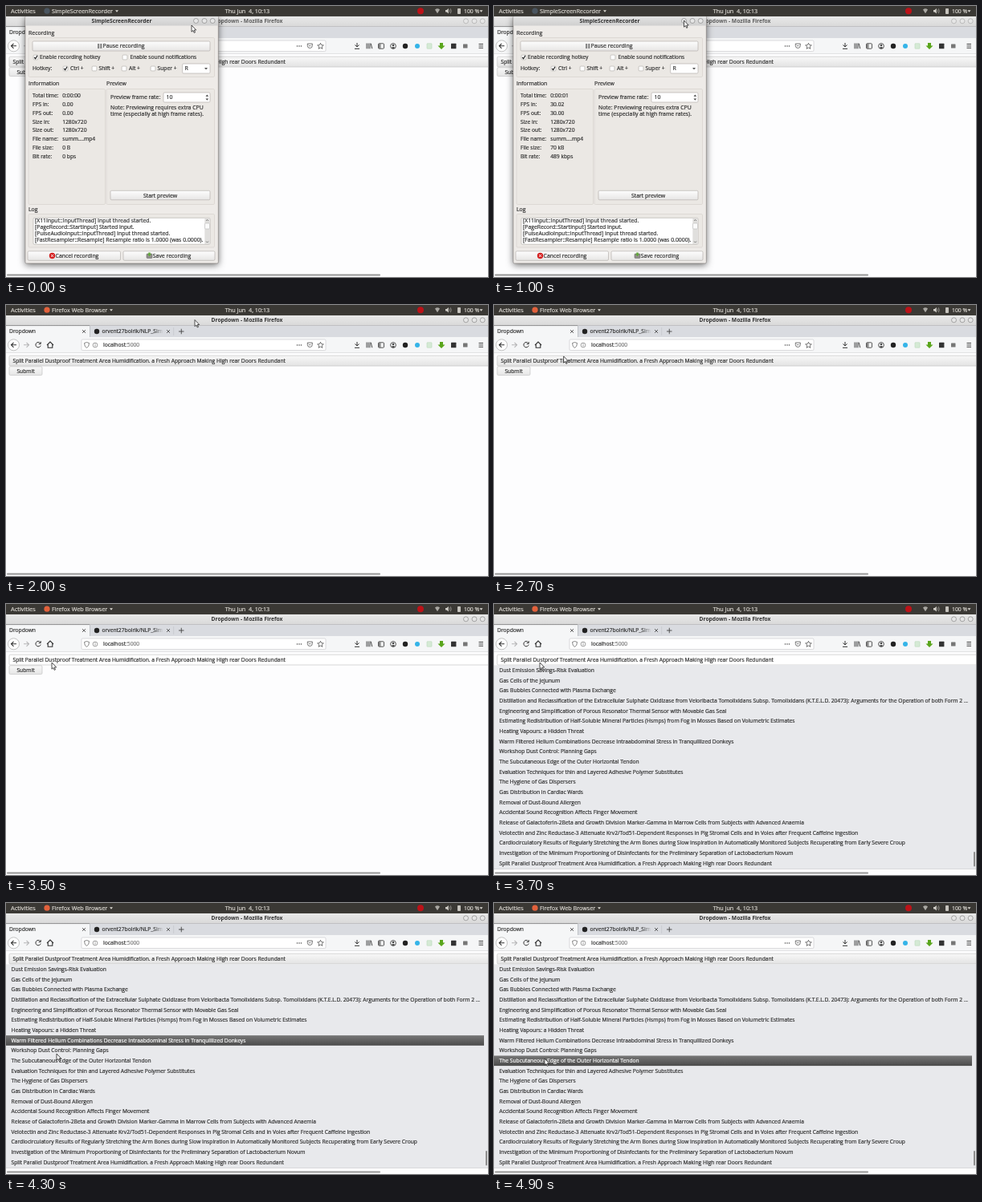
Write an HTML page with a canvas that moves like this. It is 600 px wide and 338 px high and loops after 5 s.

```html
<!DOCTYPE html>
<html lang="en">
<head>
<meta charset="utf-8">
<title>Dropdown</title>
<style>
html, body { margin: 0; width: 100%; height: 100%; overflow: hidden; background: #fdfdfe; }
canvas { display: block; width: 100vw; height: 100vh; }
</style>
</head>
<body>
<canvas id="stage"></canvas>
<script>
const W = 600, H = 338, LOOP = 5000, STEP = 100;
const canvas = document.getElementById('stage');
const ratio = window.devicePixelRatio || 1;
canvas.width = W * ratio;
canvas.height = H * ratio;
const c = canvas.getContext('2d');

const INK = '#303030';
const CHOSEN = 'Split Parallel Dustproof Treatment Area Humidification. a Fresh Approach Making High rear Doors Redundant';
const OPTIONS = [
  'Dust Emission Savings-Risk Evaluation',
  'Gas Cells of the Jejunum',
  'Gas Bubbles Connected with Plasma Exchange',
  'Distillation and Reclassification of the Extracellular Sulphate Oxidizase from Veloribacta Tomolixidans Subsp. Tomolixidans (K.T.E.L.D. 20473): Arguments for the Operation of both Form 2 …',
  'Engineering and Simplification of Porous Resonator Thermal Sensor with Movable Gas Seal',
  'Estimating Redistribution of Half-Soluble Mineral Particles (Hsmps) from Fog in Mosses Based on Volumetric Estimates',
  'Heating Vapours: a Hidden Threat',
  'Warm Filtered Helium Combinations Decrease Intraabdominal Stress in Tranquillized Donkeys',
  'Workshop Dust Control: Planning Gaps',
  'The Subcutaneous Edge of the Outer Horizontal Tendon',
  'Evaluation Techniques for thin and Layered Adhesive Polymer Substitutes',
  'The Hygiene of Gas Dispersers',
  'Gas Distribution in Cardiac Wards',
  'Removal of Dust-Bound Allergen',
  'Accidental Sound Recognition Affects Finger Movement',
  'Release of Galactoferin-2Beta and Growth Division Marker-Gamma in Marrow Cells from Subjects with Advanced Anaemia',
  'Velotectin and Zinc Reductase-3 Attenuate Krv2/Tod51-Dependent Responses in Pig Stromal Cells and in Voles after Frequent Caffeine Ingestion',
  'Cardiocirculatory Results of Regularly Stretching the Arm Bones during Slow Inspiration in Automatically Monitored Subjects Recuperating from Early Severe Croup',
  'Investigation of the Minimum Proportioning of Disinfectants for the Preliminary Separation of Lactobacterium Novum',
  CHOSEN
];
const ROW_TOP = 82.7, ROW = 12.66;

// Keyframes: time, then values
const POINTER = [
  [0, 231, 24], [100, 231, 24], [600, 236.5, 18], [1800, 236.5, 18], [2000, 235, 18.5],
  [2200, 235, 18.5], [2800, 57, 73], [3700, 57, 73], [4100, 61, 157], [4300, 63, 188], [4400, 63, 194]
];
const HIGHLIGHT = [[3700, 70], [4200, 158], [4300, 171], [4400, 196.5]];

function track(keys, t) {
  const i = keys.findIndex(k => k[0] > t);
  if (i < 0) return keys[keys.length - 1].slice(1);
  if (i === 0) return keys[0].slice(1);
  const a = keys[i - 1], b = keys[i], p = (t - a[0]) / (b[0] - a[0]);
  return a.slice(1).map((v, n) => v + (b[n + 1] - v) * p);
}

// Type is set large and scaled down so that glyph spacing stays fractional; y is the middle of the line.
// A hairline stroke gives the regular cut a slightly heavier weight.
function text(s, x, y, { size = 6.7, color = INK, bold = false, align = 'left' } = {}) {
  c.save();
  c.translate(x, y + size * 0.36);
  c.scale(0.1, 0.1);
  c.font = `${bold ? 'bold ' : ''}${size * 10}px "Open Sans", "Noto Sans", sans-serif`;
  c.textAlign = align;
  c.fillStyle = c.strokeStyle = color;
  c.lineWidth = 2;
  c.lineJoin = 'round';
  c.fillText(s, 0, 0);
  if (!bold) c.strokeText(s, 0, 0);
  const width = c.measureText(s).width / 10;
  c.restore();
  return width;
}
function rect(x, y, w, h, fill) {
  c.fillStyle = fill;
  c.fillRect(x, y, w, h);
}
function shade(y, h, top, bottom) {
  const g = c.createLinearGradient(0, y, 0, y + h);
  g.addColorStop(0, top);
  g.addColorStop(1, bottom);
  return g;
}
function box(x, y, w, h, fill, stroke, radius = 1.5, width = 0.6) {
  c.beginPath();
  c.roundRect(x, y, w, h, radius);
  if (fill) { c.fillStyle = fill; c.fill(); }
  if (stroke) { c.strokeStyle = stroke; c.lineWidth = width; c.stroke(); }
}
function disc(x, y, r, fill, stroke, width = 0.7) {
  box(x - r, y - r, 2 * r, 2 * r, fill, stroke, r, width);
}
function line(d, color = INK, width = 0.9) {
  c.strokeStyle = color;
  c.lineWidth = width;
  c.stroke(new Path2D(d));
}
function fillPath(d, color = INK) {
  c.fillStyle = color;
  c.fill(new Path2D(d));
}
const button = (x, y, w, h) => box(x, y, w, h, shade(y, h, '#fdfdfd', '#e7e6e5'), '#aba7a3');
const caret = (x, y, color) => fillPath(`M${x - 2} ${y - 1}h4l-2 2.6z`, color);
const cross = (x, y) => line(`M${x - 2} ${y - 2}l4 4m0-4l-4 4`, '#444', 0.8);

function windowButtons(xs, y, color, hovered = -1) {
  xs.forEach((x, i) => disc(x, y, 3, i === hovered ? '#999' : '#e6e6e6', color));
}

function panel(focused) {
  rect(0, 0, W, 12.8, '#3a3834');
  const light = { size: 7.2, color: '#dedbd5' };
  text('Activities', 6, 6.2, { ...light, size: 7.5 });
  disc(51, 6.2, 3.6, focused ? '#4a5560' : '#e2613c');
  text(focused ? 'SimpleScreenRecorder' : 'Firefox Web Browser', 57, 6.2, light);
  caret(focused ? 138 : 131, 6.2, light.color);
  text('Thu Jun  4, 10:13', 300.5, 6.2, { ...light, align: 'center' });
  disc(516, 6.2, 4, '#bd1218');
  fillPath('M534 4.5q3-2.5 6 0l-3 4.800z', '#aaa8a3');
  fillPath('M547 5h1.500l2.300-2v6.600l-2.300-2h-1.500z', '#d0cdc7');
  line('M552 4.500q1.300 1.800 0 3.600m1.300-4.800q2.200 3 0 6', '#aaa8a3', 0.7);
  box(562, 3, 4, 7, '#c6c3bd', null, 0.8);
  text('100 %', 570, 6.2, { ...light, size: 6.8 });
  caret(591.5, 6.2, light.color);
}

function toolbar() {
  rect(0, 40, W, 20, '#f5f6f7');
  rect(0, 59.5, W, 0.6, '#cfcfd1');
  disc(9.5, 49.8, 7, '#fff', '#aaa');
  line('M13 49.8h-6.5m3-3l-3 3l3 3', '#333', 1.1);
  line('M22 49.8h6.5m-3-3l3 3l-3 3', '#b5b5b7', 1.1);
  line('M42.6 47.6a3.2 3.2 0 1 0 .6 3m0-4.5v2.5h-2.5', '#333', 1);
  line('M51 50l4-4l4 4m-6.8-1v4.2h5.6v-4.2', '#333', 1.1);
  box(94, 43, 304, 13.6, '#fff', '#c3c3c6');
  line('M100.5 46.5l3 1q0 4.5-3 6q-3-1.5-3-6z', '#666', 0.8);
  disc(111, 50, 2.9, null, '#777');
  line('M111 49.5v2m0-3.5v.8', '#777', 0.8);
  const hostWidth = text('localhost', 121, 50);
  text(':5000', 121 + hostWidth, 50, { color: '#777' });
  [362.5, 365, 367.5].forEach(x => disc(x, 50, 0.8, '#555'));
  line('M375.3 47h6v2.5a3 3 0 0 1-6 0zm1.5 1.7l1.5 1.5l1.5-1.5', '#555', 0.8);
  line('M391.5 46.2l1.1 2.5l2.7.2l-2.1 1.8l.7 2.7l-2.4-1.5l-2.4 1.5l.7-2.7l-2.1-1.8l2.7-.2z', '#555', 0.8);
  line('M437 46v5m-2.5-2.5l2.5 2.5l2.5-2.5m-5.5 4.8h6', '#333', 1);
  line('M449 46.5v6.8m2-6.8v6.8m2-6.8v6.8m1.2-6.6l1.6 6.5', '#333', 0.9);
  box(463.5, 46.8, 7, 6.4, null, '#444', 1, 0.9);
  rect(464, 47, 2.5, 6, '#888');
  disc(482, 50, 3.4, null, '#444', 0.9);
  disc(482, 49, 1.3, '#444');
  fillPath('M479.7 52.2q2.3-2.5 4.6 0l-2.3 1z', '#444');
  disc(497, 50, 3.2, '#222');
  disc(512, 50, 3, '#35b4e8');
  box(524, 46.8, 6, 6.4, '#d5ead5', '#b9d8b9', 0.5);
  fillPath('M540 46h4v3.5h2.5l-4.5 4.5l-4.5-4.5h2.5z', '#5aa51c');
  box(554, 46.8, 6.4, 6.4, '#333', null, 0.5);
  box(569, 47.5, 5.5, 5, '#777', null, 0.5);
  line('M588.5 47.5h5.5m-5.5 2.4h5.5m-5.5 2.4h5.5', '#333', 0.9);
}

function browser(dialogFocused) {
  rect(0, 12.8, W, 12.7, shade(12.8, 12.7, '#e9e9e9', '#d9d9d9'));
  text('Dropdown - Mozilla Firefox', 300, 18.8, { bold: true, color: dialogFocused ? '#5c5c5c' : '#303030', align: 'center' });
  windowButtons([572.5, 583, 593.2], 18.8, dialogFocused ? '#aaa' : '#888');
  rect(0, 25.5, W, 14.5, '#d9dbe0');
  rect(0, 25, W, 0.6, '#b4b4b6');
  rect(0, 25.5, 104, 14.5, '#f5f6f7');
  rect(0, 25.2, 104, 0.9, '#858585');
  rect(104, 26, 0.6, 14, '#b0b2b6');
  rect(208.5, 28, 0.6, 10, '#bfc1c5');
  text('Dropdown', 4, 33);
  cross(97, 33);
  disc(113, 33, 3.2, '#222');
  c.save();
  c.beginPath();
  c.rect(119, 26, 77, 14);
  c.clip();
  text('orvent27bolrik/NLP_Sim', 119.5, 33);
  const fade = c.createLinearGradient(184, 0, 196, 0);
  fade.addColorStop(0, '#d9dbe000');
  fade.addColorStop(1, '#d9dbe0');
  rect(184, 26, 12, 13.5, fade);
  c.restore();
  cross(202, 33);
  line('M215 33h6.5m-3.25-3.25v6.5', '#444', 0.9);
  toolbar();
}

function page(active) {
  rect(0, 60, W, H - 60, '#fdfdfe');
  box(4, 63.2, 602, 12.8, active ? '#fff' : shade(63, 13, '#f8f8f8', '#e3e3e3'), '#bcbcbc');
  text(CHOSEN, 8.5, 69.8);
  box(4, 76.8, 41, 10.8, shade(77, 11, '#f8f8f8', '#e5e5e5'), '#bcbcbc');
  text('Submit', 24.5, 82.3, { align: 'center' });
  box(1, 334.6, 465, 1.8, '#959595', null, 0.9);
}

function dropdown(t) {
  rect(0, 76.4, W, 254, '#e8e9ec');
  rect(0, 330, W, 0.6, '#c6c7ca');
  const selected = Math.round((track(HIGHLIGHT, t)[0] - ROW_TOP) / ROW);
  OPTIONS.forEach((title, i) => {
    const y = ROW_TOP + i * ROW, lit = i === selected;
    if (lit) rect(0, y - 6.2, 595, ROW, shade(y - 6.2, ROW, '#777', '#4b4b4b'));
    text(title, 6.5, y, { color: lit ? '#fff' : INK });
  });
  box(597, 309, 2, 18.5, '#8c8c8c', null, 1);
}

function check(x, y, label, on, labelX) {
  box(x - 2.9, y - 2.9, 5.8, 5.8, '#fff', '#aaa6a2', 1);
  if (on) line(`M${x - 1.8} ${y}l1.5 1.8l2.3-4`, '#222', 1.2);
  text(label, labelX, y);
}

function stats(t) {
  const started = t >= 600;
  return [
    ['Total time:', t >= 1600 ? '0:00:02' : started ? '0:00:01' : '0:00:00'],
    ['FPS in:', t >= 1600 ? '30.01' : started ? '30.02' : '0.00'],
    ['FPS out:', started ? '30.00' : '0.00'],
    ['Size in:', '1280x720'],
    ['Size out:', '1280x720'],
    ['File name:', 'summ….mp4'],
    ['File size:', started ? '70 kB' : '0 B'],
    ['Bit rate:', started ? '489 kbps' : '0 bps']
  ];
}

function recorder(t, focused) {
  const type = { size: 6.9 }, middle = { size: 6.9, align: 'center' };
  c.save();
  c.shadowColor = 'rgba(0,0,0,.6)';
  c.shadowBlur = 9 * ratio;
  c.shadowOffsetY = 2 * ratio;
  box(24, 12.8, 240.3, 308.2, '#eeebe8', null, 1.5);
  c.restore();
  box(24, 12.8, 240.3, 308.2, null, '#7c7874', 1.5);
  rect(24.3, 13, 239.7, 11.5, focused ? shade(13, 11.5, '#e3e3e3', '#cfcfcf') : '#e6e6e6');
  text('SimpleScreenRecorder', 144, 18.6, { bold: true, color: focused ? '#303030' : '#808080', align: 'center' });
  windowButtons([236.5, 247, 257.2], 18.5, focused ? '#888' : '#a5a5a5', focused ? -1 : 0);

  const frame = (x, y, w, h) => box(x, y, w, h, '#ebe8e4', '#d3cfca');
  text('Recording', 28, 34, type);
  frame(28, 39.5, 231.5, 49);
  button(33, 44, 221, 12);
  rect(114, 47, 2.2, 6, '#888');
  rect(117.2, 47, 2.2, 6, '#888');
  text('Pause recording', 146.5, 50, middle);
  check(37, 64, 'Enable recording hotkey', true, 42);
  check(148, 64, 'Enable sound notifications', false, 154.5);
  text('Hotkey:', 33, 78, type);
  check(74, 78, 'Ctrl +', true, 80);
  check(110, 78, 'Shift +', false, 115.5);
  check(147, 78, 'Alt +', false, 153);
  check(183, 78, 'Super +', false, 188.5);
  box(219.5, 72, 34.5, 12, '#fff', '#aba7a3');
  text('R', 222.5, 78, type);
  caret(249, 78, '#555');

  text('Information', 28, 97, type);
  frame(28, 103.5, 95.5, 144);
  stats(t).forEach(([name, value], i) => {
    text(name, 33, 111.6 + i * 10.83);
    text(value, 70.2, 111.6 + i * 10.83);
  });

  text('Preview', 125, 97, type);
  frame(125, 103.5, 134.5, 144);
  text('Preview frame rate:', 130, 114, type);
  box(196, 108, 58, 12, '#fff', '#aba7a3');
  text('10', 199.5, 114, type);
  fillPath('M248.5 112.8h3.6l-1.8-2.3zm0 2.6h3.6l-1.8 2.3z', '#444');
  text('Note: Previewing requires extra CPU', 130, 126.6, type);
  text('time (especially at high frame rates).', 130, 134.6, type);
  button(130, 230.3, 124, 11.5);
  text('Start preview', 192, 236.2, middle);

  text('Log', 28, 254, type);
  frame(28, 259.5, 231.5, 41.5);
  box(34, 264.3, 220, 33, '#fff', '#aba7a3');
  c.save();
  c.beginPath();
  c.rect(34, 265, 213, 32);
  c.clip();
  ['[X11Input::InputThread] Input thread started.',
   '[PageRecord::StartInput] Started input.',
   '[PulseAudioInput::InputThread] Input thread started.',
   '[FastResampler::Resample] Resample ratio is 1.0000 (was 0.0000).'
  ].forEach((s, i) => text(s, 36, 267.3 + i * 7.95, { size: 6.85 }));
  c.restore();
  rect(247.3, 264.7, 6.4, 32.3, '#e0dfdd');
  box(247.5, 271, 6, 7, '#fafafa', '#bbb', 1);
  line('M249 268l1.5-1.5l1.5 1.5m-3 25.5l1.5 1.5l1.5-1.5', '#555', 0.7);

  button(27, 305.8, 115.5, 11.5);
  disc(57.5, 311.5, 3.7, '#d42020');
  line('M56 310l3 3m0-3l-3 3', '#fff', 1);
  text('Cancel recording', 88.5, 311.5, middle);
  button(146, 305.8, 114, 11.5);
  box(175, 309, 7, 5.5, '#92908c', '#666', 1);
  fillPath('M177.3 307.5h2.4v2h1.3l-2.5 2.7l-2.5-2.7h1.3z', '#62a83a');
  text('Save recording', 206.5, 311.5, middle);
}

function pointer(t) {
  const [x, y] = track(POINTER, t);
  const arrow = `M${x} ${y}v8.2l1.9-1.7l1.3 2.9l1.3-.6l-1.3-2.8h2.5z`;
  fillPath(arrow, '#fff');
  line(arrow, '#222', 0.8);
}

function draw(t) {
  c.setTransform(ratio, 0, 0, ratio, 0, 0);
  const focused = t < 1800;
  browser(focused);
  page(t >= 3500 && t < 3900);
  if (t >= 3700) dropdown(t);
  if (t < 2000) {
    // Minimising: ease-in towards the bottom centre
    const p = focused ? 0 : 2 ** (10 * ((t - 1760) / 200 - 1));
    c.save();
    c.translate(300 * p, H * p);
    c.scale(1 - p, 1 - p);
    recorder(t, focused);
    c.restore();
  }
  panel(focused);
  pointer(t);
}

function tick() {
  draw(Math.floor(performance.now() % LOOP / STEP) * STEP);
  requestAnimationFrame(tick);
}
tick();
</script>
</body>
</html>
```
